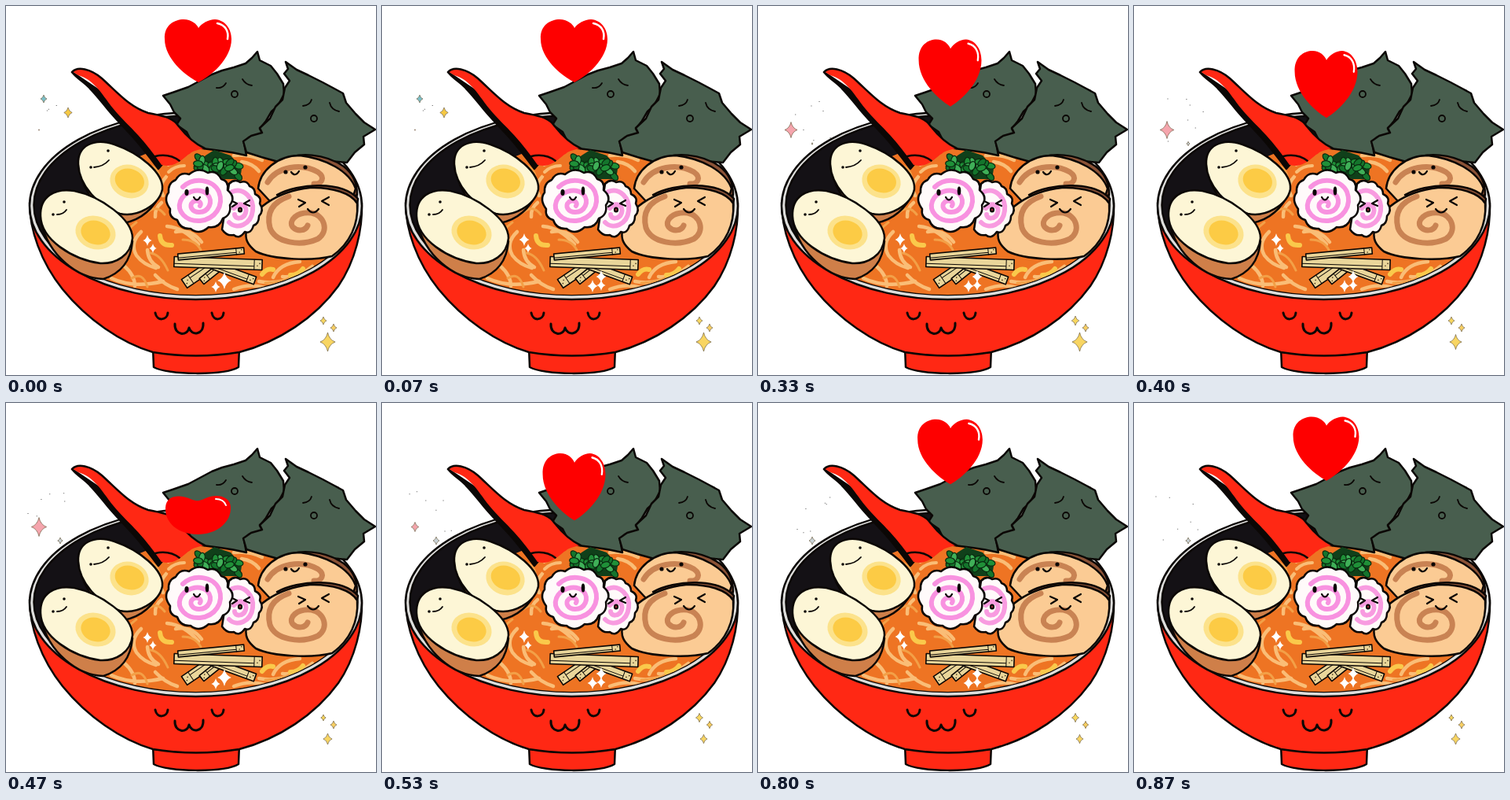
Recreate the animation shown at these times as an HTML page. Size 471 px wide and 469 px high, loop 0.94 s.

```html
<!DOCTYPE html>
<html lang="en">
<head>
<meta charset="utf-8">
<title>Ramen bowl</title>
<style>
  html, body { margin: 0; width: 100%; height: 100%; overflow: hidden; background: #fff; }
  svg { display: block; width: 100vw; height: 100vh; }
  .ink { fill: none; stroke: #0b0705; stroke-width: 1.8; stroke-linecap: round; stroke-linejoin: round; }
  .bold { stroke-width: 3; }
  .line { stroke: #0b0705; stroke-width: 2.5; stroke-linejoin: round; }
  .dot { fill: #0b0705; }
  .nori { fill: #485e4e; }
  .egg { fill: #fdf6d6; }
  .side { fill: #cf7f49; }
  .yolk { fill: #fce28b; }
  .core { fill: #fccb45; }
  .meat { fill: #fbcb94; }
  .rind { fill: #8b5236; }
  .swirl { fill: none; stroke-linecap: round; stroke-linejoin: round; }
  .cake { fill: #fffafa; }
  .red { fill: #ff2814; }
</style>
</head>
<body>
<svg viewBox="0 0 471 469" preserveAspectRatio="none">
  <defs>
    <clipPath id="inside"><ellipse cx="241.500" cy="253" rx="206" ry="114"/></clipPath>
  </defs>

  <!-- bowl -->
  <path class="red line" d="M187 434L188 459C205 469 278 470 296 459L297 434Z"/>
  <path class="red line" d="M30 250C30 284 44 325 72 360C103 398 146 428 187 440Q242 449 297 440C347 427 394 396 423 356C445 324 454 284 453 250Z"/>
  <ellipse class="line" fill="#dededc" cx="241.500" cy="254" rx="211.500" ry="119"/>
  <ellipse class="line" fill="#141115" cx="241.500" cy="253" rx="206" ry="114"/>
  <path class="ink bold" d="M190 390C192 401 205 400 206 390M262 390C264 401 276 400 277 390M215 404C214 419 231 420 233 409C236 420 252 418 251 403"/>

  <!-- soup -->
  <g clip-path="url(#inside)">
    <path fill="#ee7423" d="M168 192Q215 170 300 176L450 190V380H90L120 260Z"/>
    <g class="swirl" stroke="#fabd76" stroke-width="4.500">
      <path d="M207 202q12-9 26-3M204 217q-11 12-4 24M198 250q-9 7-8 18M172 287q-15 14-6 30q9 12 25 16M180 310q1 15 14 22M150 330q14 12 14 26M134 346q28 13 66 4"/>
      <path d="M205 280q22 2 40 23M216 287q20-4 33 13M190 342q12 13 28 18M340 345q8-18 34-20M322 350q25 5 48-8M352 344q20 2 38-13M290 360q20-8 40-2M300 198q14 2 22 12M290 190q20-2 36 6"/>
    </g>
    <g class="swirl" stroke="#f3a047" stroke-width="3">
      <path d="M186 204q12 7 9 22M180 262q12-10 22 3M166 275q-13 9-18 26M206 336q-9-20-22-22M160 346q14-9 20 11M330 352q20 0 36-9M225 297q16 0 23 13"/>
    </g>
    <path class="swirl" stroke="#fac94b" stroke-width="6" d="M196 292q1 13 15 12M326 341q6-8 14-6M362 342q10 0 16-8"/>
  </g>

  <!-- seaweed -->
  <path class="nori line" d="M200 114L212 110L232 103L247 95L262 87L275 82L290 78L305 73L313 66L320 58L323 69L337 76L345 86L353 99L354 112L346 127L338 134L331 146L323 156L327 163L309 167L303 174L306 190C282 184 260 183 238 179L234 168L230 160L217 151L222 143L214 135L209 125Z"/>
  <path class="nori line" d="M356 71L370 81L385 88L403 97L418 105L429 111L433 123L445 137L456 148L470 157L455 166L456 176L444 186L434 199L400 196L372 192L350 199L325 192L306 186L302 172L312 165L326 161L323 155L336 143L343 128L352 119L355 104L361 95L354 86L359 80Z"/>
  <path class="ink" d="M268 104Q276 105 280 98M301 93Q305 100 313 101M378 127Q387 126 389 119M412 123Q414 132 424 134"/>
  <g class="ink"><circle cx="291" cy="112" r="4"/><circle cx="392" cy="143" r="4"/></g>

  <!-- spoon -->
  <path class="line dot" d="M84 84C91 93 99 96 107 105C115 113 121 121 130 132C141 145 150 154 161 166C172 178 184 194 194 207L200 200L130 115Z"/>
  <path class="red" d="M92 88C102 91 107 95 114 102C122 110 128 120 137 131C148 144 157 152 168 164C179 176 188 188 198 202Q212 205 224 198L236 186Q242 183 253 181C240 175 231 167 220 153C212 141 200 140 181 136C157 128 143 111 122 92C108 80 92 76 84 83Z"/>
  <path class="ink" style="stroke-width:2.500" d="M84 84C91 76 108 80 122 92C143 111 157 128 181 136C200 140 212 141 220 153C231 167 240 175 253 181M190 191Q208 187 221 197"/>
  <path fill="#ee7423" d="M200 205Q216 203 227 193Q238 182 256 183L240 208L205 216Z"/>
  <path class="swirl" stroke="#fabd76" stroke-width="4" d="M207 211q8-8 20-8"/>

  <g id="onion"></g>

  <!-- pork -->
  <path class="rind line" d="M350 197C372 184 407 188 430 204Q447 217 447 240L430 248Z"/>
  <path class="meat line" d="M321 232C323 210 345 190 374 190C408 194 437 210 445 232L440 248L335 247Z"/>
  <path class="swirl" stroke="#c98353" stroke-width="7" d="M333 224C345 204 376 199 397 211C407 218 402 227 392 226"/>
  <path class="rind line" d="M345 240C372 225 428 222 448 245L445 262Z"/>
  <path class="meat line" d="M306 286C312 258 344 236 387 231C415 230 440 238 447 251C449 277 438 302 415 318C391 324 341 323 318 312C307 303 304 296 306 286Z"/>
  <path class="swirl" stroke="#c98353" stroke-width="7" d="M360 242C340 249 331 262 336 282C343 301 375 306 397 296C412 286 405 266 389 263C370 261 359 273 365 281C371 287 381 286 384 279"/>
  <g class="ink" style="stroke-width:2.200">
    <path d="M372 246L381 250L373 255M411 243L402 248L411 253M384 258Q391 267 398 258M363 211Q368 218 373 210"/>
    <circle cx="356" cy="211" r="1.500" class="dot"/><circle cx="381" cy="205" r="1.500" class="dot"/>
  </g>

  <!-- eggs -->
  <path class="side line" d="M93 205C98 238 121 266 150 276Q184 269 198 235Z"/>
  <path class="egg line" d="M92 201C91 178 111 167 138 176C170 187 201 212 199 233C195 253 167 269 145 264C118 255 93 228 92 201Z"/>
  <g transform="rotate(18 157 223)">
    <ellipse cx="157" cy="223" rx="25" ry="21" class="yolk"/><ellipse cx="157" cy="222" rx="19" ry="15" class="core"/>
  </g>
  <path class="side line" d="M45 275C54 317 91 346 124 347Q158 336 161 299Z"/>
  <path class="egg line" d="M44 267C43 242 62 231 87 235C121 242 161 271 161 295C159 317 140 328 120 327C84 322 45 297 44 267Z"/>
  <g transform="rotate(18 114 288)">
    <ellipse cx="114" cy="288" rx="26" ry="21" class="yolk"/><ellipse cx="114" cy="288" rx="19" ry="15" class="core"/>
  </g>
  <path class="ink" d="M112 205Q124 204 131 196M65 265Q73 265 77 259"/>
  <g class="dot">
    <circle cx="108" cy="205" r="1.800"/><circle cx="130" cy="184" r="1.800"/>
    <circle cx="60" cy="265" r="1.800"/><circle cx="74" cy="249" r="1.800"/>
  </g>

  <!-- fish cakes -->
  <path class="cake line" d="M284 226Q291 219 298 224Q307 221 310 229Q317 231 317 239Q326 243 323 251Q329 260 322 267Q322 277 315 279Q312 290 304 287Q297 297 290 291Q281 293 275 284Z"/>
  <path class="swirl" stroke="#f89be0" stroke-width="6" d="M288 236C303 230 316 245 314 260C312 278 294 285 284 275M290 257C298 248 308 254 305 263C302 272 291 271 291 265"/>
  <path class="cake line" d="M216 221Q222 210 233 214Q245 204 257 212Q268 208 274 220Q284 222 282 234Q293 243 285 253Q287 266 276 270Q271 283 258 281Q246 292 235 283Q222 284 218 272Q207 269 209 258Q200 246 207 237Q206 225 216 221Z"/>
  <path class="swirl" stroke="#f892e0" stroke-width="6" d="M225 230C239 217 263 220 271 236C278 254 266 271 247 273C229 274 217 261 222 248C227 236 245 230 256 239C265 248 258 262 246 262C237 262 232 254 238 249C244 245 250 250 247 254"/>
  <g class="ink" style="stroke-width:2.200">
    <path d="M239 243Q243 250 247 243M288 248L294 251L288 255M310 247L303 251L310 254"/>
    <ellipse cx="230" cy="237" rx="1.500" ry="3" class="dot"/><ellipse cx="256" cy="235" rx="1.200" ry="4.500" class="dot"/>
    <ellipse cx="298" cy="259" rx="2" ry="2.500" fill="#b3263c"/>
  </g>

  <g id="bamboo"></g>
  <path id="soupStars" fill="#fff"/>
  <path id="dots" fill="#777"/>
  <g id="stars" stroke="#5b4a2c" stroke-width=".6"></g>

  <g id="heart">
    <path fill="#fe0000" d="M0 0C-16-8-43-30-43-55C-44-73-30-80-19-80C-9-80-2-74 0-69C4-75 13-80 21-80C35-79 42-67 42-55C42-30 16-8 0 0Z"/>
    <path class="swirl" stroke="#fff" stroke-width="2.500" d="M24-75C34-73 39-65 37-55"/>
  </g>
  <g id="flat">
    <path fill="#fe0000" d="M244 167C219 167 202 152 203 133C204 117 221 116 235 122C242 125 246 125 254 121C268 115 285 118 286 132C287 152 268 167 244 167Z"/>
    <path class="swirl" stroke="#fff" stroke-width="2" d="M267 122Q277 122 280 130"/>
  </g>
</svg>

<script>
const $ = id => document.getElementById(id);
const NS = 'http://www.w3.org/2000/svg';
const LOOP = 940, FPS = 15, STEPS = 14;

function add(parent, tag, attrs) {
  const el = document.createElementNS(NS, tag);
  for (const key in attrs) el.setAttribute(key, attrs[key]);
  return parent.appendChild(el);
}

function randomFrom(seed) {
  return () => (seed = (seed * 16807) % 2147483647) / 2147483647;
}

// spring onion heap
const rnd = randomFrom(4211);
add($('onion'), 'path', { d: 'M238 204L254 190L265 183L286 190L300 207L298 220L278 220L254 212Z', fill: '#10401a' });
for (let i = 0; i < 26; i++) {
  const u = rnd(), x = 243 + u * 53;
  const y = 197 + u * 12 + (rnd() - .5) * 18;
  add($('onion'), 'ellipse', {
    cx: x, cy: y, rx: 6, ry: 3.800, transform: `rotate(${rnd() * 180} ${x} ${y})`,
    fill: ['#14752c', '#1f9038', '#3fb058'][i % 3], stroke: '#0a2a10', 'stroke-width': 1.200
  });
}

function stick(x1, y1, x2, y2, w) {
  const len = Math.hypot(x2 - x1, y2 - y1), turn = Math.atan2(y2 - y1, x2 - x1) * 180 / Math.PI;
  const g = add($('bamboo'), 'g', { transform: `translate(${x1} ${y1}) rotate(${turn})` });
  add(g, 'rect', { y: -w / 2, width: len, height: w, class: 'line', fill: '#ead69a', style: 'stroke-width:1.6' });
  add(g, 'path', { d: `M0 ${w / 6}H${len - 10}M${len - 10} ${-w / 2}V${w / 2}`, class: 'ink', style: 'stroke-width:1' });
  for (const k of [3, 6]) add(g, 'circle', { cx: len - k, cy: k - 4.500, r: .8, fill: '#3b2a14' });
}
stick(264, 328, 227, 353, 13);
stick(274, 330, 249, 350, 9);
stick(262, 329, 317, 349, 10);
stick(214, 325, 326, 329, 13);
stick(219, 319, 303, 311, 8);

function star(x, y, r) {
  const w = r * .8, k = .22;
  return `M${x} ${y - r}Q${x + w * k} ${y - r * k} ${x + w} ${y}Q${x + w * k} ${y + r * k} ${x} ${y + r}`
    + `Q${x - w * k} ${y + r * k} ${x - w} ${y}Q${x - w * k} ${y - r * k} ${x} ${y - r}Z`;
}

// keys are pairs of step and radius
const stars = [
  { x: 48, y: 118, fill: '#79bfc9', keys: [[0, 5], [1, 5], [3, 0], [8, 0], [10, 3], [12, 0]] },
  { x: 79, y: 135.500, fill: '#f6c944', keys: [[0, 6.500], [1, 6.500], [3, 11], [5, 0]] },
  { x: 42, y: 157.500, fill: '#f5a5ad', keys: [[0, .8], [1, .8], [3, 8], [5, 10], [7, 12], [9, 0]] },
  { x: 69, y: 175, fill: '#c9d3d8', keys: [[4, 0], [7, 4], [10, 7], [13, 4]] },
  { x: 404, y: 400, fill: '#f8d75f', keys: [[0, 5], [1, 5], [3, 11], [5, 6], [7, 4], [10, 9], [13, 4]] },
  { x: 417, y: 409, fill: '#f8cf62', keys: [[0, 5], [1, 5], [3, 4], [5, 5], [7, 5], [10, 4], [13, 5]] },
  { x: 409.500, y: 427, fill: '#f8d562', keys: [[0, 12], [1, 12], [3, 6], [5, 12], [7, 7], [10, 3], [13, 7]] }
];
for (const s of stars) s.el = add($('stars'), 'path', { fill: s.fill });

function radiusAt(keys, n) {
  if (n < keys[0][0]) return 0;
  for (let i = 1; i < keys.length; i++) {
    const [a, ra] = keys[i - 1], [b, rb] = keys[i];
    if (n <= b) return ra + (rb - ra) * (n - a) / (b - a);
  }
  return keys[keys.length - 1][1];
}

function drawHeart(n) {
  const squashed = n === 7;
  $('flat').style.display = squashed ? '' : 'none';
  $('heart').style.display = squashed ? 'none' : '';
  // falls and rises on matching parabolas
  const t = n * 1000 / FPS;
  const dt = n < 7 ? Math.max(0, t - 22) : Math.max(0, 940 - t);
  const drop = n < 2 ? 0 : dt * dt * .000316;
  const pull = Math.min(1, Math.sqrt(drop) / 5.500);
  $('heart').setAttribute('transform',
    `translate(245 ${97 + drop}) scale(${1 - .06 * pull} ${1 + .065 * pull})`);
}

function draw(n) {
  drawHeart(n);
  for (const s of stars) {
    const r = radiusAt(s.keys, n);
    s.el.setAttribute('d', r > 0 ? star(s.x, s.y, r) : '');
  }
  const soft = n % 7 === 0;
  $('soupStars').setAttribute('d', soft
    ? star(180, 298, 7) + star(187, 308, 6) + star(278, 349, 11) + star(267, 357, 7)
    : star(181, 297, 8) + star(186, 308, 6) + star(279, 344, 8) + star(268, 356, 8) + star(279, 355, 7));

  const pick = randomFrom(971 + 7919 * Math.max(n, 1));
  pick();
  let d = '';
  for (let i = 0; i < (n < 4 ? 3 : 7); i++) {
    const x = 27 + pick() * 67, y = 112 + pick() * 62;
    d += `M${x} ${y}h1.300v1h-1.300z`;
  }
  $('dots').setAttribute('d', d);
}

const start = performance.now();
let shown = -1;
function tick() {
  const t = (performance.now() - start) % LOOP;
  let n = 0;
  while (n < STEPS - 1 && Math.round((n + 1) * 100 / FPS) * 10 <= t) n++;
  if (n !== shown) draw(shown = n);
  requestAnimationFrame(tick);
}
tick();
</script>
</body>
</html>
```
